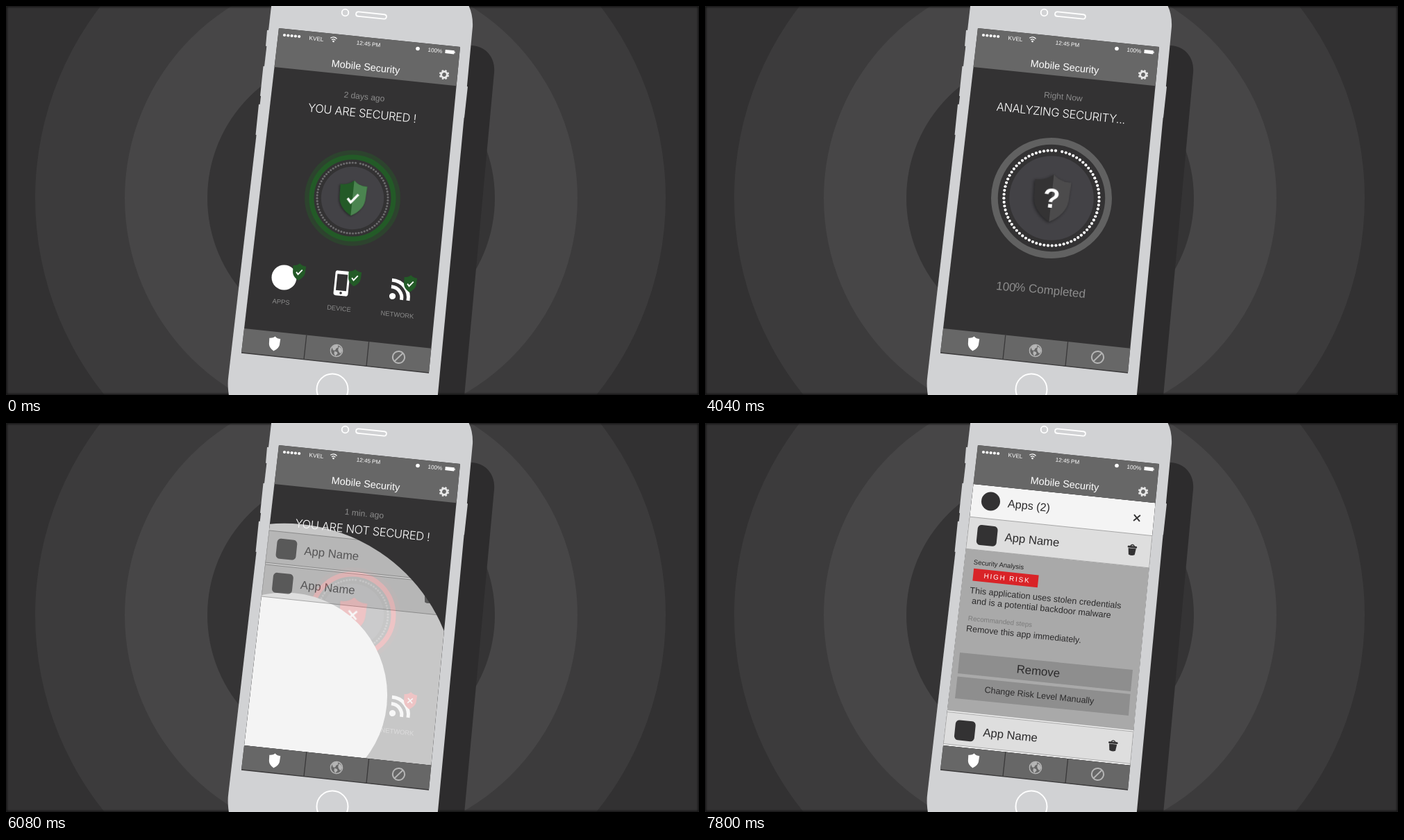
Write an HTML page that moves like this. It is 998 px wide and 561 px high and loops after 8000 ms.

```html
<!DOCTYPE html>
<html lang="en">
<head>
<meta charset="utf-8">
<title>Mobile Security</title>
<style>
  html, body { margin: 0; width: 100%; height: 100%; overflow: hidden; background: #323132; }
  svg { display: block; width: 100vw; height: 100vh; }
  text { font-family: "Liberation Sans", Arial, sans-serif; text-rendering: geometricPrecision; }
  .light { font-family: Inter, "Liberation Sans", sans-serif; font-weight: 300; letter-spacing: -.3px; }
</style>
</head>
<body>
<svg id="stage" viewBox="0 0 998 561"></svg>
<script>
const LOOP = 8000, TILT = 5.9, DOTS = 75;
const HEAD = .1195, BAR = .2205, ROW = .0985, TABS = .925;
const RED = '#d92327', GREEN = '#235a27', INK = '#333233', GREY = '#b5b5b5';

// Screen quad: u runs across, v runs down.
const pt = (u, v) => {
  const lx = 393 - 54 * v, ly = 32 + 468 * v, rx = 654 - 45 * v, ry = 59 + 470 * v;
  return [lx + (rx - lx) * u, ly + (ry - ly) * u];
};
const quad = (v0, v1) =>
  [pt(0, v0), pt(1, v0), pt(1, v1), pt(0, v1)].map(p => p.map(n => n.toFixed(2)).join()).join(' ');
const band = (v0, v1, fill) => `<polygon points="${quad(v0, v1)}" fill="${fill}"/>`;
const line = (a, b, color) => `<path d="M${a.join(' ')}L${b.join(' ')}" stroke="${color}" stroke-width="1.3"/>`;
const at = (x, y, body) => `<g transform="translate(${x} ${y}) rotate(${TILT})">${body}</g>`;
const label = (x, y, str, size, fill, attrs = '') =>
  at(x, y, `<text y="${size * .355}" font-size="${size}" fill="${fill}" text-anchor="middle" ${attrs}>${str}</text>`);

const SHIELD = 'M0-25.5C-5-20.5-12-18-19.5-18.5L-18.5 2C-17.5 12-10 20 0 25.5C10 20 17.5 12 18.5 2L19.5-18.5C12-18 5-20.5 0-25.5Z';
const HALF = 'M0-25.5C5-20.5 12-18 19.5-18.5L18.5 2C17.5 12 10 20 0 25.5Z';
const CHECK = '<path d="M-7 1L-2 6.5L8-6" fill="none" stroke="#fff" stroke-width="3.4"/>';
const CROSS = '<path d="M-6-6L6 6M6-6L-6 6" fill="none" stroke="#fff" stroke-width="2.8"/>';
const shield = (fill, half) => `<path d="${SHIELD}" fill="${fill}"/>` + (half ? `<path d="${HALF}" fill="${half}"/>` : '');
const badge = (x, y) => at(x, y, `<g transform="scale(.48)">
  <g class="ok">${shield(GREEN)}<g transform="scale(1.15)">${CHECK}</g></g>
  <g class="bad">${shield(RED)}<g transform="scale(1.2)">${CROSS}</g></g></g>`);

const backdrop = `
  <rect width="998" height="561" fill="#323132"/>
  <circle cx="496" cy="277" r="454" fill="#3c3b3c"/>
  <circle cx="497" cy="277" r="326" fill="#474647"/>
  <circle cx="497" cy="277" r="207" fill="#353435"/>
  <path d="M640 54L672 57C692 59 705 75 703 96L660 563H600Z" fill="#2d2c2d"/>
  <rect width="998" height="561" fill="none" stroke="#141414" stroke-width="3" filter="url(#soft)"/>`;

const body = `
  <path d="M378.5 35L376.5 58M373 87L368.5 130M366.5 142L362 186M662.5 116L657.5 161" stroke="#d1d2d4" stroke-width="5"/>
  <path d="M383-8L320 537C319 546 320 556 321.5 565H621.5L672 30Q673 8 662-8Z" fill="#d1d2d4"/>
  <g fill="none" stroke="#fff" stroke-width="1.8">
    <circle cx="488.5" cy="9.5" r="4.8"/>
    ${at(526, 13.5, '<rect x="-22" y="-3.2" width="44" height="6.4" rx="3.2"/>')}
    <circle cx="470" cy="553" r="22.5" stroke-width="2"/>
  </g>
  ${band(0, 1, INK)}`;

const header = `
  ${band(0, HEAD, '#676767')}
  ${[0, 1, 2, 3, 4].map(i => `<circle cx="${401 + 5.3 * i}" cy="${42 + .5 * i}" r="2.1" fill="#fff"/>`).join('')}
  ${label(447, 47, 'KVEL', 8.2, '#fff')}
  ${at(471.5, 51, `<path d="M-4.6-4.2A6.5 6.5 0 0 1 4.6-4.2M-2.7-2A3.8 3.8 0 0 1 2.7-2" fill="none" stroke="#fff" stroke-width="1.3"/>
    <circle r="1.3" fill="#fff"/>`)}
  ${label(522, 54.5, '12:45 PM', 8.1, '#fff')}
  <circle cx="593" cy="61.5" r="2.8" fill="#fff"/>
  ${label(618, 64, '100%', 8.2, '#fff')}
  ${at(639.5, 66.2, '<rect x="-7" y="-2.6" width="13" height="5.2" fill="#fff"/><rect x="6" y="-1.2" width="1.2" height="2.4" fill="#fff"/>')}
  ${label(518, 87.5, 'Mobile Security', 14.5, '#fff')}
  ${at(631, 99, `<g fill="none" stroke="#e8e8e8"><circle r="4.3" stroke-width="2.8"/>
    <circle r="6.1" stroke-width="2.2" stroke-dasharray="2.396"/></g>`)}`;

const divider = u => line(pt(u, TABS), pt(u, 1), '#3a393a');
const tabs = `
  ${band(TABS, 1, '#676767')}${divider(1 / 3)}${divider(2 / 3)}${line(pt(0, 1), pt(1, 1), '#3a393a')}
  ${at(386.5, 487, `<path d="${SHIELD}" transform="scale(.41)" fill="#fff"/>`)}
  ${at(476, 497, `<circle r="8.6" fill="none" stroke="${GREY}" stroke-width="1.5"/>
    <path d="M-7-4Q-3-9 1-8L2-5L-1-3L-2 0L-5 0ZM-3 1L1 2L2 4L-1 8L-3 5ZM3-6Q8-4 8 0L6 4L3 1L2-2Z" fill="${GREY}"/>`)}
  ${at(565.5, 506.5, `<path d="M-5.6 6.6L5.6-6.6" stroke="${GREY}" stroke-width="2"/><circle r="8.6" fill="none" stroke="${GREY}" stroke-width="2"/>`)}`;

const title = (id, small, big, x) => `<g id="${id}">
  ${label(516, 130.5, small, 12.1, '#8c8c8c')}
  ${label(x, 154.5, big, 16.5, '#fff', 'class="light"')}</g>`;

const dots = Array.from({ length: DOTS }, (_, i) => {
  const a = (12.8 + 4.76 * i) * Math.PI / 180;
  return `<circle cx="${(51 * Math.sin(a)).toFixed(2)}" cy="${(-51 * Math.cos(a)).toFixed(2)}" r="1.55"/>`;
}).join('');

const dial = `<g transform="translate(499 277)">
  <circle id="halo" r="69"/>
  <circle id="well" r="57" fill="${INK}"/>
  <circle id="ring" r="59" fill="none" stroke-width="7"/>
  <g id="core">
    <circle r="45.2" fill="#434246"/>
    <g id="dots">${dots}</g>
    <g transform="rotate(${TILT})" style="filter:drop-shadow(-1px 1px 1.5px #0007)">
      <g id="safe">${shield(GREEN, '#4b8450')}${CHECK}</g>
      <g id="scan">${shield('#343334', '#4c4b4c')}
        <text y="10.5" font-size="29.5" font-weight="bold" fill="#fff" text-anchor="middle">?</text></g>
      <g id="risk">${shield(RED)}${CROSS}</g>
    </g>
  </g></g>`;

const percent = `<g id="percent">
  ${at(433.5, 404.6, '<text id="count" y="6" font-size="17" fill="#8c8c8c" text-anchor="middle">0</text>')}
  ${at(548, 415, '<text y="6" font-size="17" fill="#8c8c8c" text-anchor="end">% Completed</text>')}</g>`;

// Each icon: scale centre, then its markup.
const icons = [
  [400, 400, '<circle cx="400.5" cy="391.5" r="18" fill="#fff"/>' + badge(422, 383.5) + label(396, 426.5, 'APPS', 9.4, '#8c8c8c')],
  [483, 408, at(483.5, 400, `<rect x="-10.5" y="-18" width="21" height="36" rx="3.5" fill="#fff"/>
    <rect x="-7.5" y="-13" width="15" height="23.5" fill="${INK}"/><circle cy="14" r="1.8" fill="${INK}"/>`)
    + badge(502, 392) + label(479.5, 436, 'DEVICE', 9.3, '#8c8c8c')],
  [566, 417, at(556.5, 418.5, `<circle r="4.6" fill="#fff"/>
    <path d="M-3-13.5A16 16 0 0 1 13.5 4M-3-23A25 25 0 0 1 23 4" fill="none" stroke="#fff" stroke-width="5"/>`)
    + badge(582, 400.5) + label(563.5, 445, 'NETWORK', 9.4, '#8c8c8c')]
];
const iconRow = icons.map(i => `<g class="icon">${i[2]}</g>`).join('');

const rowMarkup = `<g class="row"><polygon fill="#dedede" stroke="#a6a6a6"/><g class="parts">
  <g class="part"><rect x="-14.5" y="-14.5" width="29" height="29" rx="5.5" fill="${INK}"/></g>
  <g class="part"><text y="6" font-size="16.7" fill="#2b2a2b">App Name</text></g>
  <g class="part" fill="${INK}"><path d="M-5.6-2.6L-4.4 6.6Q0 8.8 4.4 6.6L5.6-2.6Z"/>
    <rect x="-6.8" y="-6" width="13.6" height="2.8" rx="1.3"/>
    <path d="M-3-5.6Q0-10 3-5.6" fill="none" stroke="${INK}" stroke-width="1.4"/></g></g></g>`;

const detail = `<g id="detail" clip-path="url(#drawer)">
  ${band(BAR + ROW, .83, '#a9a9a9')}
  <g id="notes">
  ${label(423, 204, 'Security Analysis', 9.6, '#222')}
  ${at(433, 223.5, `<rect x="-47" y="-9" width="94" height="18" fill="${RED}"/>`)}
  ${label(435, 223.7, 'HIGH RISK', 10, '#fff', 'letter-spacing="1.8"')}
  ${label(490.5, 252, 'This application uses stolen credentials', 12.6, '#2b2a2b')}
  ${label(484.5, 266.5, 'and is a potential backdoor malware', 12.6, '#2b2a2b')}
  ${label(425, 286, 'Recommanded steps', 9.8, '#7b7b7b')}
  ${label(459, 304.5, 'Remove this app immediately.', 12.5, '#2b2a2b')}
  <path d="M367 331L616 356L613 387L364 361ZM363.5 365.5L612.5 391L610 422L360 397Z" fill="#8e8e8e"/>
  ${label(480, 357.5, 'Remove', 16.8, '#2b2a2b')}
  ${label(481.5, 392.5, 'Change Risk Level Manually', 12.5, '#2b2a2b')}</g></g>`;

const panel = `<g id="panel" mask="url(#reveal)"><g clip-path="url(#view)">
  ${band(HEAD, TABS, '#f4f4f4')}
  <circle cx="411.5" cy="113" r="13.5" fill="${INK}"/>
  ${label(466.5, 119, 'Apps (2)', 16.2, '#2b2a2b')}
  ${at(622, 137, `<path d="M-4.5-4.5L4.5 4.5M4.5-4.5L-4.5 4.5" stroke="${INK}" stroke-width="1.9"/>`)}
  ${detail}${rowMarkup}${rowMarkup}</g></g>`;

const stage = document.getElementById('stage');
stage.innerHTML = `<defs>
  <filter id="soft"><feGaussianBlur stdDeviation="1.2"/></filter>
  <clipPath id="view"><polygon points="${quad(HEAD, TABS)}"/></clipPath>
  <clipPath id="drawer"><polygon id="drawerShape"/></clipPath>
  <mask id="reveal" maskUnits="userSpaceOnUse" x="0" y="0" width="998" height="561">
    <circle id="wide" cx="401" cy="392.5" fill="#fff" fill-opacity=".77"/>
    <circle id="tight" cx="401" cy="392.5" fill="#fff"/></mask></defs>
  ${backdrop}${body}${title('t0', '2 days ago', 'YOU ARE SECURED !', 513)}
  ${title('t1', 'Right Now', 'ANALYZING SECURITY...', 512.5)}
  ${title('t2', '1 min. ago', 'YOU ARE NOT SECURED !', 513.5)}
  ${dial}${percent}${iconRow}${panel}${header}${tabs}`;

const $ = id => document.getElementById(id);
const all = sel => [...stage.querySelectorAll(sel)];
const set = (el, name, value) => el.setAttribute(name, value);
const fade = (el, o) => { set(el, 'opacity', o); set(el, 'visibility', o > 0 ? 'visible' : 'hidden'); };

const dotEls = all('#dots circle'), iconEls = all('.icon'), okEls = all('.ok'), badEls = all('.bad');
const rows = all('.row').map(el => ({
  box: el.querySelector('polygon'), parts: el.querySelector('.parts'), items: [...el.querySelectorAll('.part')]
}));

const unit = (t, a, b) => Math.min(1, Math.max(0, (t - a) / (b - a)));
const smooth = x => x * x * (3 - 2 * x);
const linear = x => x;

// Keys alternate time and value.
function track(t, keys, ease = smooth) {
  let v = keys[1];
  for (let i = 2; i < keys.length; i += 2)
    v += (keys[i + 1] - keys[i - 1]) * ease(unit(t, keys[i - 2], keys[i]));
  return v;
}

function blend(a, b, x) {
  return `rgb(${a.map((n, i) => Math.round(n + (b[i] - n) * x)).join()})`;
}

function placeRow(row, v) {
  set(row.box, 'points', quad(v, v + ROW));
  [[.106, .052], [.203, .05], [.898, .05]].forEach(([u, dv], i) => {
    const [x, y] = pt(u, v + dv);
    set(row.items[i], 'transform', `translate(${x} ${y}) rotate(${TILT})`);
  });
}

function drawDial(t) {
  const late = t > 3000;
  const core = track(t, [1160, 1, 1640, 1.376, 1880, 1.345, 4080, 1.345, 4420, 1]);
  const ring = track(t, [1160, 1, 1640, 1.376, 1880, 1.345, 3960, 1.345, 4040, 1.392, 4080, 1.392, 4420, 1]);
  const toGrey = smooth(unit(t, 1240, 1560)), toRed = smooth(unit(t, 4080, 4300));
  set($('core'), 'transform', `scale(${core})`);
  set($('well'), 'transform', `scale(${ring})`);
  set($('ring'), 'transform', `scale(${ring})`);
  set($('ring'), 'stroke', late ? blend([97, 97, 97], [217, 35, 39], toRed) : blend([35, 90, 39], [97, 97, 97], toGrey));
  set($('halo'), 'fill', late ? '#402b2c' : '#2d432e');
  fade($('halo'), track(t, [1160, 1, 1360, 0, 4300, 0, 4500, 1]));
  fade($('safe'), 1 - toGrey);
  fade($('scan'), toGrey * (1 - toRed));
  fade($('risk'), toRed);

  const p = track(t, [2040, 0, 2240, .1, 2860, .3, 3680, .81, 4000, 1], linear);
  const lit = t < 4140 ? Math.round(p * DOTS) : 0;
  dotEls.forEach((d, i) => set(d, 'fill', i < lit ? '#fff' : '#6c6b6d'));
  $('count').textContent = Math.round(p * 100);
  fade($('percent'), track(t, [2040, 0, 2200, 1, 4060, 1, 4180, 0]));
}

function drawHome(t) {
  fade($('t0'), 1 - unit(t, 2040, 2120));
  fade($('t1'), track(t, [2100, 0, 2220, 1, 4080, 1, 4200, 0]));
  fade($('t2'), unit(t, 4180, 4320));
  iconEls.forEach((el, i) => {
    const lag = 80 * i, [x, y] = icons[i];
    const s = track(t, [1160 + lag, 1, 1440 + lag, 0, 4120 + lag, 0, 4360 + lag, 1.04, 4440 + lag, 1]);
    set(el, 'transform', `translate(${x} ${y}) scale(${s}) translate(${-x} ${-y})`);
    fade(el, Math.min(1, s));
  });
  const bad = t > 3000;
  okEls.forEach(el => set(el, 'display', bad ? 'none' : 'inline'));
  badEls.forEach(el => set(el, 'display', bad ? 'inline' : 'none'));
}

function drawPanel(t) {
  set($('panel'), 'display', t > 5600 ? 'inline' : 'none');
  set($('wide'), 'r', 480 * unit(t, 5600, 6400) ** 1.3);
  set($('tight'), 'r', 400 * unit(t, 5760, 6400) ** 1.44);
  const rest = (1 - unit(t, 5700, 6560)) ** 2;
  const open = .5025 * smooth(unit(t, 7180, 7800));
  const second = BAR + ROW + .156 * rest + open;
  placeRow(rows[0], BAR + .136 * rest);
  placeRow(rows[1], second);
  rows.forEach(r => set(r.parts, 'opacity', unit(t, 5800, 6200)));
  set($('drawerShape'), 'points', quad(BAR + ROW, Math.max(BAR + ROW, second - .004)));
  set($('detail'), 'display', open > 0 ? 'inline' : 'none');
  set($('notes'), 'opacity', smooth(unit(t, 7300, 7700)));
}

function frame(now) {
  const t = now % LOOP;
  drawDial(t);
  drawHome(t);
  drawPanel(t);
  requestAnimationFrame(frame);
}
frame(0);
</script>
</body>
</html>
```
